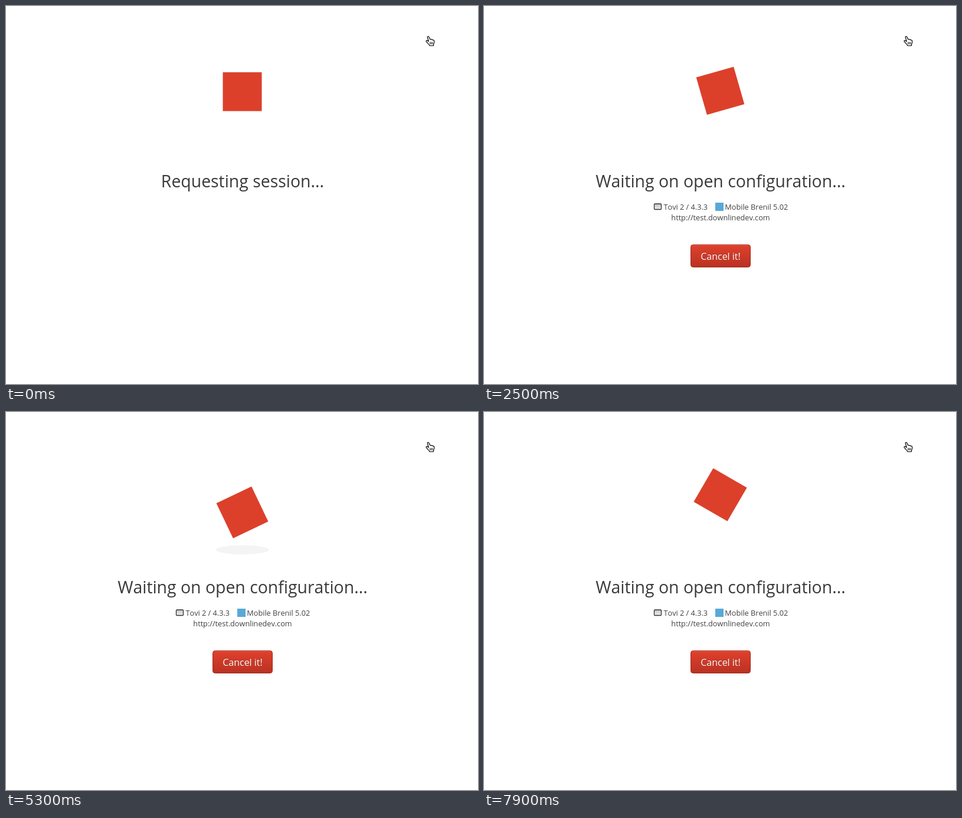
Write an HTML page that moves like this. It is 800 px wide and 642 px high and loops after 8 s.

```html
<!DOCTYPE html>
<html lang="en">
<head>
<meta charset="utf-8">
<title>Session loader</title>
<style>
  html, body { margin: 0; width: 100%; height: 100%; overflow: hidden; background: #fff; }
  svg { display: block; width: 800px; height: 642px; font-family: "Open Sans", sans-serif; font-kerning: none; }
  .title { font-size: 28.4px; fill: #3a3a3a; text-anchor: middle; }
  .info { font-size: 12.7px; fill: #404040; }
  .mid { text-anchor: middle; }
  .label { font-size: 16px; text-anchor: middle; }
</style>
</head>
<body>
<svg viewBox="0 0 800 642">
  <defs>
    <linearGradient id="red" x2="0" y2="1">
      <stop stop-color="#e0402d"/>
      <stop offset="1" stop-color="#b93222"/>
    </linearGradient>
    <linearGradient id="screen" x2="0" y2="1">
      <stop stop-color="#c4c4c4"/>
      <stop offset="1" stop-color="#f0f0f0"/>
    </linearGradient>
  </defs>

  <ellipse id="shadow" cx="400.5" cy="234" ry="7.8" fill="#f4f4f4"/>
  <rect id="mark" x="-33" y="-33" width="66" height="66" fill="#dc402b"/>

  <text id="request" class="title" x="401" y="308">Requesting session...</text>

  <g id="waiting">
    <text class="title" x="401" y="308">Waiting on open configuration...</text>
    <rect x="288.5" y="336" width="12" height="9.5" rx="1.2" fill="url(#screen)" stroke="#333" stroke-width="1.3"/>
    <text class="info" x="304.5" y="346">Tovi 2 / 4.3.3</text>
    <rect x="392" y="334" width="14" height="14" fill="#58a9d6"/>
    <text class="info" x="408.3" y="346">Mobile Brenil 5.02</text>
    <text class="info mid" x="401" y="364">http://test.downlinedev.com</text>
    <rect x="350.5" y="405.5" width="101" height="38" rx="4" fill="url(#red)" stroke="#a62b1d"/>
    <path d="M354 406.5h94" stroke="#e7604f"/>
    <text class="label" x="401" y="430" fill="#000" opacity=".25">Cancel it!</text>
    <text class="label" x="401" y="431" fill="#fff">Cancel it!</text>
  </g>

  <g fill="#fff" stroke="#000" stroke-width="1.2" stroke-linejoin="round" stroke-linecap="round">
    <path d="M714.2 52.6c.2-1.4 2-1.4 2.6-.2l2 4.4c.9-.7 2-.4 2.5.5.9-.6 2-.2 2.4.7 1.1-.3 2 .3 2.1 1.5.2 2.6-.6 3.9-1.1 5.4l-.4 2.6h-6.2c-.8-2.4-3.4-4.2-5.6-6.8-1.2-1.5.2-2.8 1.8-1.9l2 1.4z"/>
    <path d="M718.8 61.5v3.4M720.8 61.5v3.4M722.8 61.5v3.4" stroke-width=".9"/>
  </g>
</svg>
<script>
  const LOOP = 8000, STEP = 100, RESTART = 1500;

  // [time in ms, height of the mark's centre]
  const first = [[0, 145.5], [900, 158.5], [1100, 162.5], [1500, 168]];
  const second = [
    [1500, 128.5], [1800, 132.5], [2500, 144], [2900, 151], [3900, 164.5], [4200, 167],
    [5300, 170.5], [6000, 169], [6400, 166], [6600, 162], [7500, 146], [7900, 140.5]
  ];

  const $ = id => document.getElementById(id);
  const clamp = v => Math.max(0, Math.min(1, v));

  function sample(path, t) {
    const i = Math.max(1, path.findIndex(p => p[0] >= t));
    const [t0, y0] = path[i - 1], [t1, y1] = path[i];
    return y0 + (y1 - y0) * (t - t0) / (t1 - t0);
  }

  function draw(ms) {
    const t = Math.floor(ms % LOOP / STEP) * STEP;
    const waiting = t >= RESTART;
    const y = sample(waiting ? second : first, t);
    const angle = waiting ? -16 + (t - 2500) * 0.1252 : t * 0.1127;

    $("mark").setAttribute("transform", `translate(400.5 ${y}) rotate(${angle})`);
    $("shadow").setAttribute("rx", 43 + 2 * clamp((y - 162) / 8));
    $("shadow").setAttribute("opacity", clamp((y - 158.5) / 3));
    $("request").style.display = waiting ? "none" : "";
    $("waiting").style.display = waiting ? "" : "none";
  }

  const start = performance.now();
  function tick() {
    draw(performance.now() - start);
    requestAnimationFrame(tick);
  }
  tick();
</script>
</body>
</html>
```
